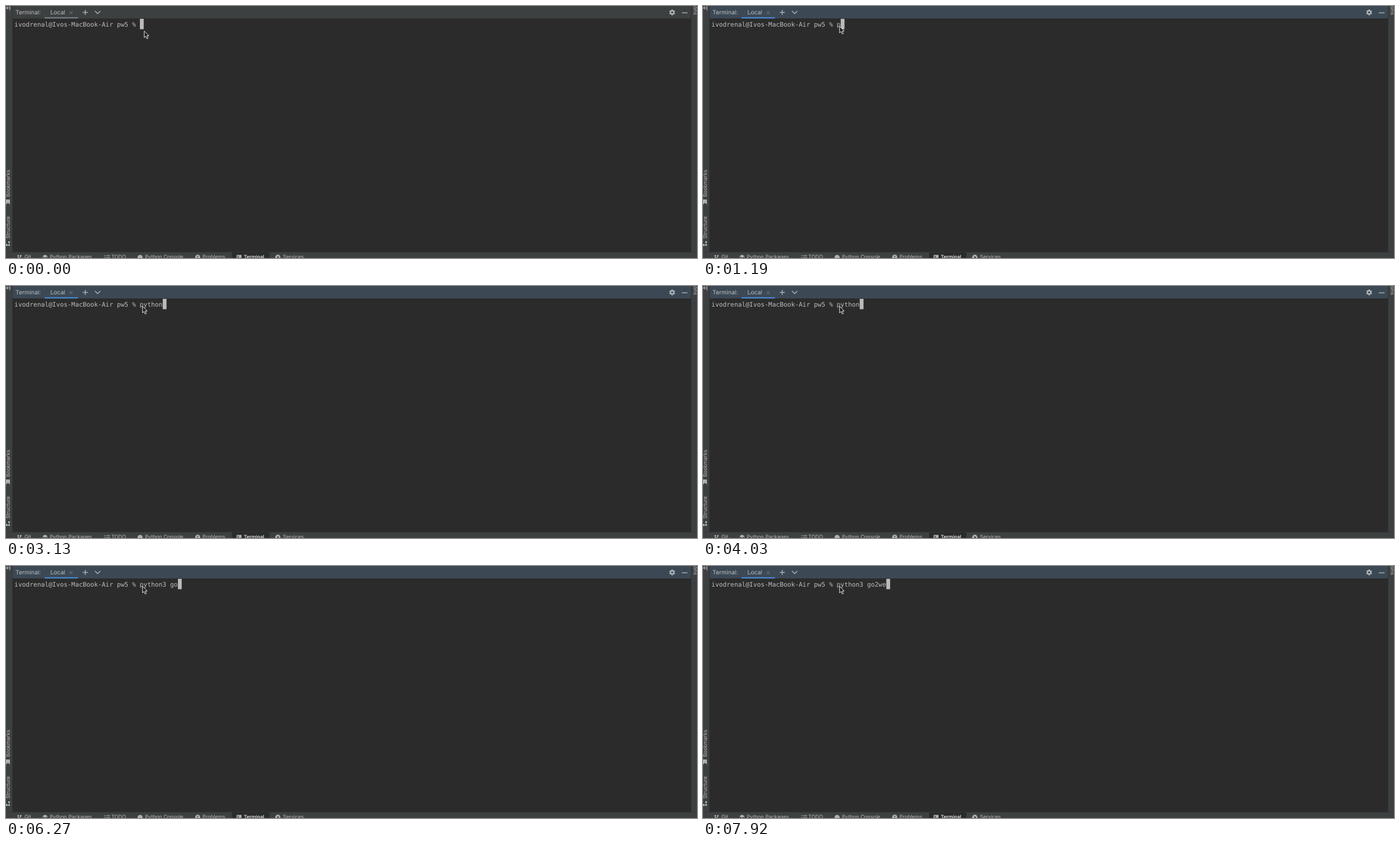
An HTML page that plays this animation: 1238x452 px, repeating every 8 s.

```html
<!DOCTYPE html>
<html lang="en">
<head>
<meta charset="utf-8">
<title>Terminal</title>
<style>
  html, body { margin: 0; width: 100%; height: 100%; overflow: hidden; background: #2b2b2b; }
  svg { display: block; width: 1238px; height: 452px; }
  text { font: 9.2px Inter, sans-serif; fill: #bbb; text-rendering: geometricPrecision; white-space: pre; }
  .head text { font-size: 10.45px; }
  .mono { font: 11.31px "DejaVu Sans Mono", monospace; fill: #bdbdbd; }
  .panel { fill: #3d4041; }
  .edge { fill: #323232; }
  .icon { fill: #afb1b3; }
  .line { fill: none; stroke: #afb1b3; stroke-width: 1.2; }
</style>
</head>
<body>
<svg viewBox="0 0 1238 452">
  <rect width="1238" height="452" fill="#2b2b2b"/>

  <g class="head">
    <rect id="bar" class="panel" x="12" width="1215" height="22"/>
    <rect class="edge" x="12" y="22" width="1215" height="1"/>
    <rect id="mark" x="69" y="20" width="60" height="2.4"/>
    <text x="17" y="15.2">Terminal:</text>
    <text x="79.5" y="15.2">Local</text>
    <path class="line" d="M113.5 9l6 6m0-6l-6 6" style="stroke:#7b7f82;stroke-width:1"/>
    <path class="line" d="M137.5 11.5h9M142 7v9" style="stroke-width:1.5"/>
    <path class="line" d="M159.5 9l4.7 4.7L169 9" style="stroke-width:1.5"/>
    <g id="gear" transform="translate(1193.5 11.5)">
      <circle class="line" r="2.9" style="stroke-width:2.4"/>
    </g>
    <rect class="icon" x="1211" y="11.6" width="10" height="1.4"/>
  </g>

  <g>
    <rect class="panel" width="11" height="452"/>
    <rect class="edge" x="11" width="1" height="441"/>
    <path class="line" d="M7 0v8M1 3.5h6M3.5 1L1 3.5L3.5 6"/>
    <text transform="translate(6.8 342.5) rotate(-90)">Bookmarks</text>
    <path class="icon" d="M0 347h7v9l-3.5-3L0 356z"/>
    <text transform="translate(6.8 417.3) rotate(-90)">Structure</text>
    <path class="icon" d="M4 422h3v3.3h-3zM0 427h3v3.3h-3zM4 427h3v3.3h-3z"/>
    <rect class="panel" x="1227" width="11" height="452"/>
    <rect class="edge" x="1227" width="1" height="441"/>
    <text transform="translate(1232 16) rotate(90)" text-anchor="end">Notifications</text>
  </g>

  <g>
    <rect class="panel" y="441" width="1238" height="11"/>
    <rect class="edge" y="441" width="1238" height="1"/>
    <rect x="405" y="442" width="67" height="10" fill="#292b2c"/>
    <path class="line" d="M22 447v6M22 452q4.5 0 4.5-4"/>
    <circle class="icon" cx="22" cy="448" r="1.6"/><circle class="icon" cx="26.5" cy="448" r="1.6"/>
    <path class="icon" d="M65 449l5-3 5 3-5 2.6zM65 451l5 2.5 5-2.5v2h-10z"/>
    <path class="line" d="M176 447.5h2m1.5 0h7M176 450.5h2m1.5 0h7"/>
    <circle class="icon" cx="240.3" cy="451" r="4.6"/>
    <circle class="icon" cx="343.5" cy="450.5" r="4.5"/>
    <path d="M343.5 447.8v3.4" stroke="#3d4041" stroke-width="1.3"/>
    <rect class="icon" x="413" y="446.5" width="9" height="8"/>
    <path d="M414.5 448l2 2-2 2M418 452h3" fill="none" stroke="#292b2c" stroke-width="1.1"/>
    <path class="icon" d="M484.5 446.3h5l2.5 4.3-2.5 4.2h-5l-2.5-4.2z"/>
    <path d="M486 448.3l3.6 2.4-3.6 2.4z" fill="#3d4041"/>
    <g id="tabs"></g>
  </g>

  <text id="cmd" class="mono" x="15.1" y="36.8"></text>
  <rect id="caret" y="23" width="6.8" height="18.6" fill="#bbb"/>
  <path id="mouse" d="M0 0V11.6L2.7 9.2L4.7 13.8L6.7 12.9L4.8 8.4H8.4Z"
        fill="#1c1c1c" stroke="#eee" stroke-width="1" stroke-linejoin="round"/>
</svg>

<script>
const LOOP = 8000, FOCUS = 140, CELL = 6.81, START = 239.9;
const PROMPT = 'ivodrenal@Ivos-MacBook-Air pw5 % ';
const COMMAND = 'python3 go2we';

// One time per typed character
const KEYS = [1190, 1640, 1930, 2080, 2680, 3130, 4480, 5380, 5970, 6270, 6870, 7620, 7920];
// Caret blinks off during these spans
const BLINKS = [[1040, 1190], [3580, 4030], [4930, 5380], [6720, 6870]];
// Pointer steps: time, x, y
const MOVES = [[0, 247.7, 45], [140, 247.7, 46], [290, 246.2, 36.5], [440, 244.7, 36.5]];

const TABS = [[33, 'Git'], [78.5, 'Python Packages'], [188.7, 'TODO'], [249, 'Python Console'],
              [352, 'Problems'], [426, 'Terminal'], [496, 'Services']];

const $ = id => document.getElementById(id);
const make = (parent, tag, attrs) => {
  const el = document.createElementNS('http://www.w3.org/2000/svg', tag);
  for (const key in attrs) el.setAttribute(key, attrs[key]);
  return parent.appendChild(el);
};

for (const [x, label] of TABS) {
  const tab = make($('tabs'), 'text', { x, y: 453.3 });
  tab.textContent = label;
  if (label === 'Terminal') tab.style.cssText = 'fill:#fff;font-weight:500;font-size:8.9px';
}
for (let a = 0; a < 360; a += 60) {
  make($('gear'), 'rect', { x: -1.3, y: -5.3, width: 2.6, height: 2.4, fill: '#afb1b3', transform: `rotate(${a})` });
}

function draw(t) {
  const active = t >= FOCUS;
  $('bar').style.fill = active ? '#3c4955' : '#3d4041';
  $('mark').style.fill = active ? '#4585cd' : '#747a80';

  const typed = KEYS.filter(k => t >= k).length;
  $('cmd').textContent = PROMPT + COMMAND.slice(0, typed);
  $('caret').setAttribute('x', START + typed * CELL);
  const off = BLINKS.some(([from, to]) => t >= from && t < to);
  $('caret').style.visibility = off ? 'hidden' : 'visible';

  const [, x, y] = MOVES.filter(m => t >= m[0]).pop();
  $('mouse').setAttribute('transform', `translate(${x} ${y})`);
}

const began = performance.now();
function tick() {
  draw((performance.now() - began) % LOOP);
  requestAnimationFrame(tick);
}
tick();
</script>
</body>
</html>
```
